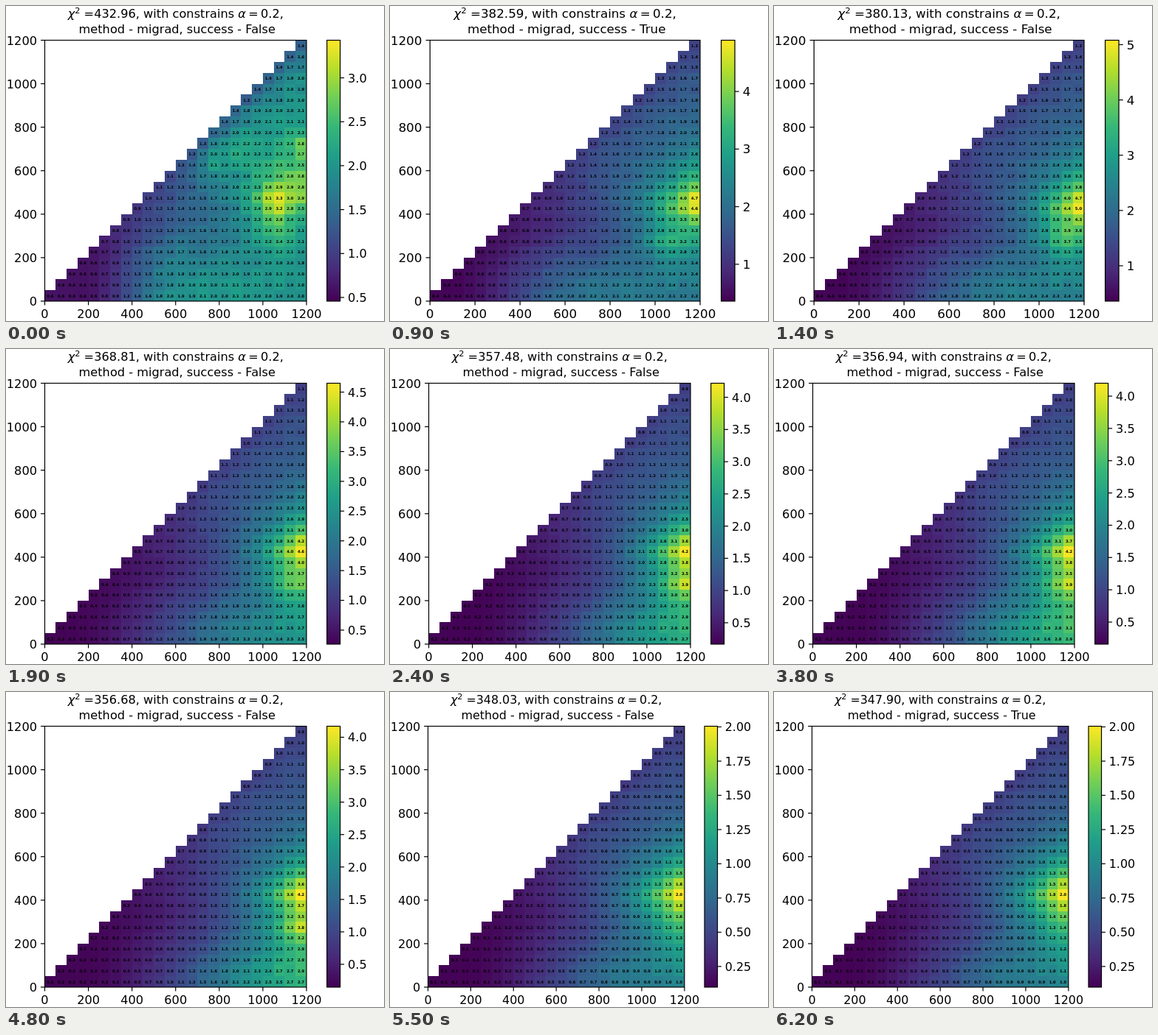
These frames come from a looping animation (512 by 428 pixels, 6.3 s). An HTML page with a canvas:

```html
<!DOCTYPE html>
<html lang="en">
<head>
<meta charset="utf-8">
<title>Fit convergence heatmap</title>
<style>
  html, body { margin: 0; width: 100%; height: 100%; overflow: hidden; background: #fff; }
  canvas { display: block; }
</style>
</head>
<body>
<canvas id="plot" width="512" height="428"></canvas>
<script>
const ctx = document.getElementById('plot').getContext('2d');
const LOOP = 6300, STEP = 100;
const LEFT = 52.5, RIGHT = 407, BAR_LEFT = 434.7, BAR_RIGHT = 452.6;
const TOP = 46.5, BOTTOM = 401, WIDTH = RIGHT - LEFT, HEIGHT = BOTTOM - TOP, N = 24;
const SIZE = 16.2, FAMILY = '"DejaVu Sans", sans-serif';

const VIRIDIS = ['440154', '482878', '3e4989', '31688e', '26828e',
                 '1f9e89', '35b779', '6ece58', 'b5de2b', 'fde725']
  .map(h => [0, 2, 4].map(k => parseInt(h.substr(k, 2), 16)));

// The figure is as wide as its bar labels need and is then fitted to the stage:
// horizontal scale by number of label decimals
const FIT = [1.032, 1, 0.98];

// far / diag: rise [amount, start, length] along the bottom row and along the diagonal
// peaks: column, row, height, reach sideways, up, down
const early = {
  lo: 0.6, far: [1.42, 3, 9.5], diag: [0.77, 3, 14], bump: 0.62, decay: 7, noise: 0.05,
  peaks: [[20.7, 8.7, 1.5, 2.2, 2.1, 2.3], [23, 10.6, 0.8, 2, 1.8, 1.8],
          [22.8, 13.8, 0.8, 1.3, 1.3, 1.3], [17.3, 13.5, 0.45, 1.3, 1.3, 1.3],
          [15, 12.2, 0.45, 1.2, 1.2, 1.2], [20.4, 5.6, 0.4, 1.6, 1.4, 1.4]]
};
const second = {
  lo: 0.4, far: [1.75, 1, 13], diag: [0.82, 4, 10], bump: 0.35, decay: 5, noise: 0.06,
  peaks: [[23, 8.4, 3.35, 3.6, 3.9, 3], [20.4, 5, 1.15, 1.9, 1.6, 1.9]]
};
const third = {
  ...second, far: [1.95, 1, 16],
  peaks: [[23, 8.2, 3.45, 3.4, 3.9, 3], [21.4, 5.4, 1.3, 1.9, 1.6, 1.9]]
};
const settled = (edge, lower) => ({
  lo: 0.19, far: [edge, 3, 22], diag: [0.7, 4, 13], bump: 0.22, decay: 5, noise: 0.05,
  peaks: [[23, 8, 2.95, 3.85, 3.85, 3.5], [23, 4.9, lower, 2.5, 1.2, 1.3]]
});
const last = {
  lo: 0.11, far: [0.7, 3, 16], diag: [0.31, 4, 11], bump: 0.1, decay: 5, noise: 0.05,
  peaks: [[23, 8, 1.46, 4.1, 4.1, 4.5]]
};

const KEYS = [
  { t: 0,    chi: 432.96, min: 0.458, max: 3.428, shape: early },
  { t: 800,  chi: 384.12, min: 0.36,  max: 4.89,  shape: second },
  { t: 900,  chi: 382.59, min: 0.36,  max: 4.89,  shape: second },
  { t: 1400, chi: 380.13, min: 0.36,  max: 5.08,  shape: third },
  { t: 2400, chi: 357.48, min: 0.168, max: 4.218, shape: settled(2.45, 1.1) },
  { t: 3800, chi: 356.94, min: 0.158, max: 4.2,   shape: settled(2.65, 1) },
  { t: 4800, chi: 356.68, min: 0.148, max: 4.17,  shape: settled(2.5, 1) },
  { t: 4900, chi: 356.62, min: 0.148, max: 4.17,  shape: settled(2.5, 1) },
  { t: 5500, chi: 348.03, min: 0.099, max: 2.005, shape: last },
  { t: 6200, chi: 347.90, min: 0.099, max: 2.005, shape: last }
];
const succeeded = t => t === 900 || t === 6200;

const lerp = (a, b, u) => a + (b - a) * u;
const clamp = x => Math.min(1, Math.max(0, x));
const smooth = x => (x = clamp(x), x * x * (3 - 2 * x));
const rise = ([amount, start, length], i) => amount * smooth((i - start) / length);
const falloff = x => Math.exp(-(Math.abs(x) ** 1.2));

function grain(i, j) {
  const s = Math.sin(i * 12.99 + j * 78.23) * 43758.5;
  return 2 * (s - Math.floor(s)) - 1;
}

function field(s, i, j) {
  const mid = (i + j) / 2;
  const bottom = s.lo + rise(s.far, i);
  const inner = s.lo + rise(s.diag, mid)
    + s.bump * smooth((mid - 8) / 8) * (1 - Math.exp((j - i) / 1.5));
  let v = lerp(inner, bottom, Math.exp(-((j / s.decay) ** 2)));
  v *= 1 + s.noise * grain(i, j) * smooth(i / 10);
  for (const [ci, cj, h, side, up, down] of s.peaks) {
    v += h * falloff((i - ci) / side) * falloff((j - cj) / (j > cj ? up : down));
  }
  return v;
}

function viridis(u) {
  const x = clamp(u) * (VIRIDIS.length - 1);
  const k = Math.min(VIRIDIS.length - 2, Math.floor(x));
  return `rgb(${VIRIDIS[k].map((c, n) => Math.round(lerp(c, VIRIDIS[k + 1][n], x - k)))})`;
}

function line(x1, y1, x2, y2) {
  ctx.beginPath();
  ctx.moveTo(x1, y1);
  ctx.lineTo(x2, y2);
  ctx.stroke();
}

function label(text, x, y, align) {
  ctx.textAlign = align;
  ctx.fillText(text, x, y);
}

const font = (size, style = '') => `${style} ${size}px ${FAMILY}`;

// Runs of text in different styles, centred as one line
function richLine(runs, cx, y) {
  ctx.textAlign = 'left';
  const widths = runs.map(([text, f, , pad = 0]) => {
    ctx.font = f;
    return ctx.measureText(text).width + 2 * pad;
  });
  let x = cx - widths.reduce((a, b) => a + b) / 2;
  runs.forEach(([text, f, lift = 0, pad = 0], k) => {
    ctx.font = f;
    ctx.fillText(text, x + pad, y - lift);
    x += widths[k];
  });
}

function drawTitle(chi, ok) {
  const cx = (LEFT + RIGHT) / 2;
  const plain = font(SIZE), math = font(SIZE, 'italic');
  richLine([
    ['χ', math], ['2', font(SIZE * 0.7), 6],
    [` =${chi.toFixed(2)}, with constrains `, plain],
    ['α', math], ['=', plain, 0, 3.2], ['0.2,', plain]
  ], cx, 16);
  ctx.font = plain;
  label(`method - migrad, success - ${ok ? 'True' : 'False'}`, cx + 2, 37, 'center');
}

function drawCells(a, b, u, min, max, fit) {
  const w = WIDTH / N, h = HEIGHT / N;
  const edgeX = i => Math.round((LEFT + i * w) * fit) / fit;
  const edgeY = j => Math.round(BOTTOM - j * h);
  ctx.font = font(5.2, 'bold');
  for (let i = 0; i < N; i++) {
    for (let j = 0; j <= i; j++) {
      const raw = lerp(field(a.shape, i, j), field(b.shape, i, j), u);
      const v = Math.min(max, Math.max(min, raw));
      const x = edgeX(i), y = edgeY(j + 1);
      ctx.fillStyle = viridis((v - min) / (max - min));
      ctx.fillRect(x, y, edgeX(i + 1) - x, edgeY(j) - y);
      ctx.fillStyle = '#000';
      label(v.toFixed(1), LEFT + (i + 0.5) * w, BOTTOM - (j + 0.5) * h + 1.9, 'center');
    }
  }
}

function drawAxes() {
  ctx.strokeRect(LEFT, TOP, WIDTH, HEIGHT);
  ctx.font = font(SIZE);
  for (let v = 0; v <= 1200; v += 200) {
    const x = lerp(LEFT, RIGHT, v / 1200), y = lerp(BOTTOM, TOP, v / 1200);
    line(x, BOTTOM, x, BOTTOM + 5.5);
    line(LEFT, y, LEFT - 5.5, y);
    label(v, x, 424, 'center');
    label(v, LEFT - 10.5, y + 6, 'right');
  }
}

function drawBar(min, max, step, decimals) {
  const w = BAR_RIGHT - BAR_LEFT;
  for (let y = Math.floor(TOP); y < BOTTOM; y++) {
    ctx.fillStyle = viridis((BOTTOM - y - 0.5) / HEIGHT);
    ctx.fillRect(BAR_LEFT, y, w, 1);
  }
  ctx.strokeRect(BAR_LEFT, TOP, w, HEIGHT);
  ctx.fillStyle = '#000';
  ctx.font = font(SIZE);
  for (let k = Math.ceil(min / step); k * step <= max; k++) {
    const y = lerp(BOTTOM, TOP, (k * step - min) / (max - min));
    line(BAR_RIGHT, y, BAR_RIGHT + 5.5, y);
    label((k * step).toFixed(decimals), BAR_RIGHT + 10.4, y + 6, 'left');
  }
}

function draw(t) {
  let k = 0;
  while (k < KEYS.length - 2 && t >= KEYS[k + 1].t) k++;
  const a = KEYS[k], b = KEYS[k + 1], u = (t - a.t) / (b.t - a.t);
  const min = lerp(a.min, b.min, u), max = lerp(a.max, b.max, u);

  // Finest tick step that leaves at most nine intervals
  const step = [0.25, 0.5, 1].find(s => (max - min) / s <= 9);
  const decimals = { 0.25: 2, 0.5: 1, 1: 0 }[step];
  const fit = FIT[decimals];

  ctx.setTransform(1, 0, 0, 1, 0, 0);
  ctx.fillStyle = '#fff';
  ctx.fillRect(0, 0, 512, 428);
  ctx.scale(fit, 1);
  ctx.strokeStyle = '#000';
  ctx.lineWidth = 1.2;
  drawCells(a, b, u, min, max, fit);
  drawAxes();
  drawBar(min, max, step, decimals);
  drawTitle(lerp(a.chi, b.chi, u), succeeded(t));
}

let start = null, shown = -1;
function tick(now) {
  if (start === null) start = now;
  const t = Math.floor(((now - start) % LOOP) / STEP) * STEP;
  if (t !== shown) draw(shown = t);
  requestAnimationFrame(tick);
}
draw(0);
requestAnimationFrame(tick);
</script>
</body>
</html>
```
